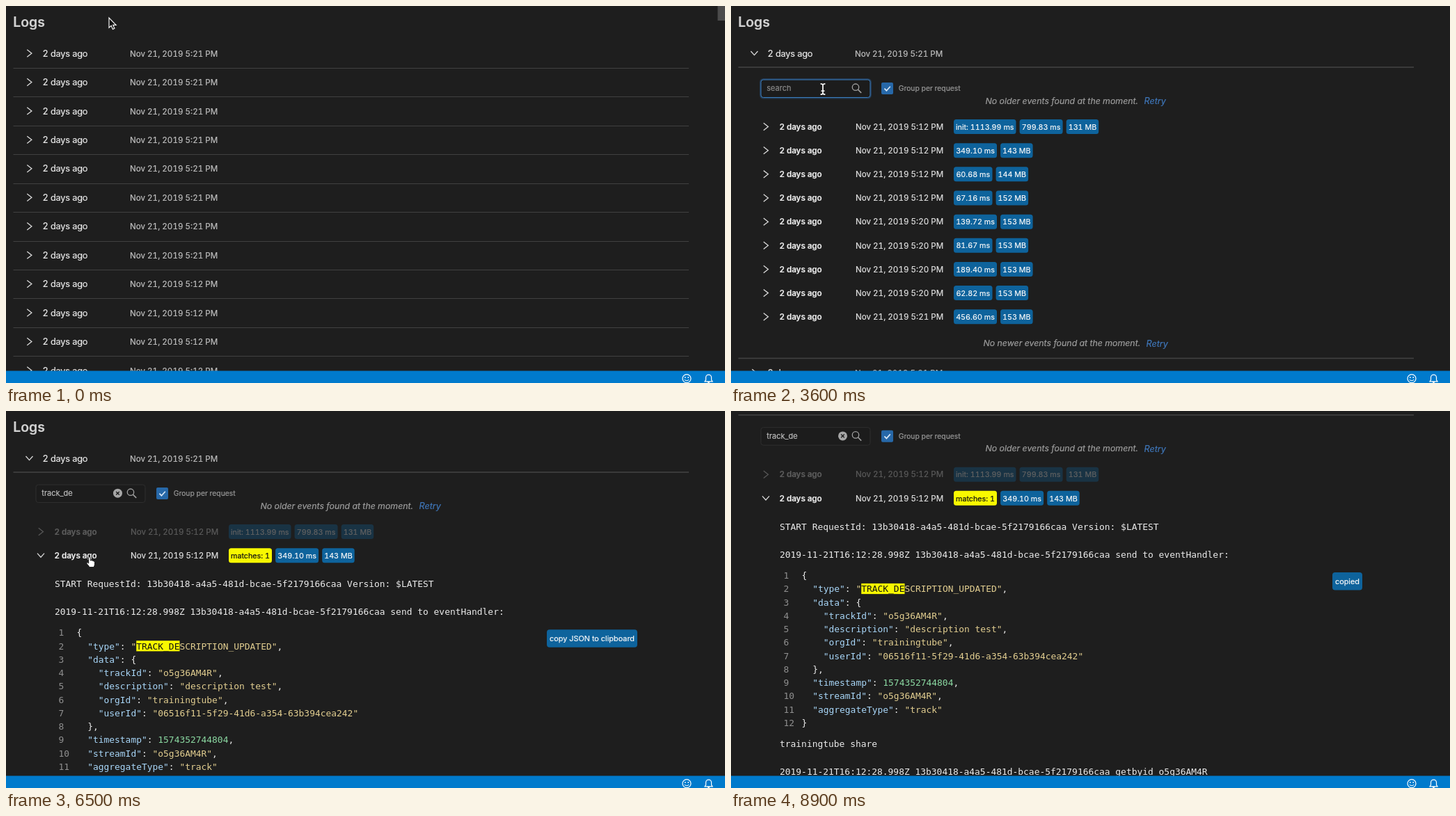
Animation, 1033 px wide and 542 px high, one loop 9 s. Source, as an HTML page:

```html
<!DOCTYPE html>
<html lang="en">
<head>
<meta charset="utf-8">
<title>Logs</title>
<style>
html, body { margin: 0; width: 100%; height: 100%; overflow: hidden; background: #1e1e1e; }
svg { display: block; font-family: Inter, "Liberation Sans", sans-serif; font-feature-settings: "tnum"; }
text { white-space: pre; stroke-width: .2px; }
.mono { font-family: "DejaVu Sans Mono", "Liberation Mono", monospace; stroke: none; }
</style>
</head>
<body>
<svg id="stage" width="1033" height="542" viewBox="0 0 1033 542"></svg>
<script>
const LOOP = 9000;
const MONO = 12.93, CHAR = MONO * 0.602;
const BLUE = '#0e639c', YELLOW = '#f8f800';
const ID_A = '35991f60-ba7c-443c-a012-f3ffe69b9d5a';
const ID_B = '13b30418-a4a5-481d-bcae-5f2179166caa';
const QUERY = 'track_de';

// y is the middle of the capital letters; a hairline stroke gives the text a little more weight
const text = (x, y, s, size, fill, extra = '') =>
  `<text x="${x}" y="${(y + size * 0.362).toFixed(2)}" font-size="${size}" fill="${fill}" stroke="${fill}" ${extra}>${s}</text>`;
const rect = (x, y, w, h, fill, extra = '') =>
  `<rect x="${x}" y="${y}" width="${w}" height="${h}" fill="${fill}" ${extra}/>`;
const path = (d, stroke, width = 1.3, extra = '') =>
  `<path d="${d}" fill="none" stroke="${stroke}" stroke-width="${width}" ${extra}/>`;
const group = (id, body, extra = '') => `<g id="${id}" ${extra}>${body}</g>`;
const mono = (x, y, s, fill = '#ebebeb') => text(x, y, s, MONO, fill, 'class="mono"');

const chevron = (x, y, open) => open
  ? path(`M${x - 5} ${y - 3}l5 5.6l5 -5.6`, '#dadada')
  : path(`M${x - 3.2} ${y - 5.2}l6.6 5.2l-6.6 5.2`, '#dadada');
const rule = (y, w = 1) => rect(10.5, y - w / 2, 970.5, w, '#414141');

function outerRow(y, minute, open) {
  return chevron(33.5, y, open) +
    text(52.6, y, '2 days ago', 12.8, '#ebebeb', 'letter-spacing="-.2"') +
    text(178, y + 0.4, `Nov 21, 2019 5:${minute} PM`, 11.6, '#c0c0c0');
}

function tagWidth(s) {
  if (s.startsWith('init')) return 89.5;
  if (s.endsWith('MB')) return 46.5;
  return s.length < 9 ? 55.5 : 62;
}

function tags(list, y) {
  let x = 320;
  return list.map(s => {
    const w = tagWidth(s), hit = s.startsWith('matches');
    const out = rect(x, y - 10.5, w, 21, hit ? YELLOW : BLUE, 'rx="3.5"') +
      text(x + w / 2, y + 0.3, s, 10.75, hit ? '#111' : '#fafafa', 'text-anchor="middle"');
    x += w + 5.1;
    return out;
  }).join('');
}

function innerRow(y, minute, body, dim, open) {
  const content = Array.isArray(body) ? tags(body, y)
    : text(320, y, body, 11.5, '#e2e2e2', 'letter-spacing="-.14"');
  return `<g opacity="${dim ? 0.3 : 1}">` + chevron(50, y, open) +
    text(69.6, y, '2 days ago', 11.7, '#ececec', 'font-weight="600" letter-spacing="-.12"') +
    text(179, y, `Nov 21, 2019 5:${minute} PM`, 11.6, '#e2e2e2') + content + '</g>';
}

const notice = (x, y, s, linkX) =>
  text(x, y, s, 12.35, '#9d9d9d', 'font-style="italic"') +
  text(linkX, y, 'Retry', 12.6, '#3f76b8', 'font-style="italic"');

function listView() {
  let out = '';
  for (let i = 0; i < 12; i++) {
    const y = 68 + 41.45 * i;
    out += outerRow(y, i < 8 ? 21 : 12) + rule(Math.round(y + 20.8) + 0.5);
  }
  return out;
}

function flatView() {
  const stamp = (sec, id, s) => `2019-11-21T16:12:${sec}Z ${id} ${s}`;
  const start = id => `START RequestId: ${id} Version: $LATEST`;
  const rows = [
    start(ID_A),
    stamp('28.421', ID_A, 'send to eventHandler: {"type":"TR...'),
    stamp('28.425', ID_A, 'getbyid o5g36AM4R'),
    stamp('28.692', ID_A, 'getByIdUsingSnapshot G0kJrQ7zA'),
    stamp('28.817', ID_A, 'getbyid G0kJrQ7zA'),
    `END RequestId: ${ID_A}`,
    ['init: 1113.99 ms', '799.83 ms', '131 MB'],
    start(ID_B),
    stamp('28.998', ID_B, 'send to eventHandler: {"type":"T...'),
    stamp('28.998', ID_B, 'getbyid o5g36AM4R'),
    stamp('29.190', ID_B, 'getByIdUsingSnapshot G0kJrQ7...')
  ];
  return rows.map((r, i) => innerRow(173.5 + 33.27 * i + (i > 6 ? 0.7 : 0), 12, r)).join('');
}

const REQUESTS = [
  [12, 'init: 1113.99 ms', '799.83 ms', '131 MB'],
  [12, '349.10 ms', '143 MB'], [12, '60.68 ms', '144 MB'], [12, '67.16 ms', '152 MB'],
  [20, '139.72 ms', '153 MB'], [20, '81.67 ms', '153 MB'], [20, '189.40 ms', '153 MB'],
  [20, '62.82 ms', '153 MB'], [21, '456.60 ms', '153 MB']
];

function requestRow(i, filtered, open) {
  const [minute, ...list] = REQUESTS[i];
  const hit = i === 1 || i === 5;
  return innerRow(173.5 + 34.16 * i, minute, filtered && hit ? ['matches: 1', ...list] : list,
    filtered && !hit, open);
}

const requestView = filtered =>
  REQUESTS.map((_, i) => requestRow(i, filtered)).join('') +
  notice(362.5, 485, 'No newer events found at the moment.', 596.5) +
  rule(506.5, 1.6) + outerRow(527.5, 21);

function jsonLine(s) {
  return s.replace(/"[^"]*"(?=:)|"[^"]*"|\d{6,}|[^"\d]+/g, t => {
    if (t[0] !== '"') return /\d/.test(t) ? `<tspan fill="#8bd9a2">${t}</tspan>` : t;
    if (JSON_KEYS.has(t)) return `<tspan fill="#a8d6f8">${t}</tspan>`;
    return `<tspan fill="#e2ce90">${t.replace('TRACK_DE', '<tspan fill="#111">TRACK_DE</tspan>')}</tspan>`;
  });
}

const EVENT = {
  type: 'TRACK_DESCRIPTION_UPDATED',
  data: {
    trackId: 'o5g36AM4R', description: 'description test', orgId: 'trainingtube',
    userId: '06516f11-5f29-41d6-a354-63b394cea242'
  },
  timestamp: 1574352744804, streamId: 'o5g36AM4R', aggregateType: 'track'
};
const JSON_KEYS = new Set([...Object.keys(EVENT), ...Object.keys(EVENT.data)].map(k => `"${k}"`));

function detailView() {
  const x = 101.6;
  let out = requestRow(0, true) + requestRow(1, true, true) +
    mono(70, 248.4, `START RequestId: ${ID_B} Version: $LATEST`) +
    mono(70, 288.7, `2019-11-21T16:12:28.998Z ${ID_B} send to eventHandler:`) +
    rect(x + 11 * CHAR, 330.2, 8 * CHAR, 15.2, YELLOW);
  JSON.stringify(EVENT, null, 2).split('\n').forEach((s, i) => {
    const y = 318.6 + 19.27 * i;
    out += mono(75.5, y, i + 1, '#8f8f8f') + mono(x, y, jsonLine(s));
  });
  return out + mono(70, 560.2, 'trainingtube share') +
    mono(70, 600.5, `2019-11-21T16:12:28.998Z ${ID_B} getbyid o5g36AM4R`);
}

const button = (id, x, s) => group(id,
  rect(x, 314.3, 907 - x, 25.5, BLUE, 'rx="4"') +
  text((x + 907) / 2, 327.2, s, 10.9, '#fafafa', 'text-anchor="middle"'));

const toolbar =
  outerRow(68, 21, true) + rule(88, 1.6) +
  rect(43, 106, 157, 25.5, '#1c1c1c', 'rx="3.5" stroke="#2e2e2e" id="field"') +
  group('halo', rect(42, 105, 159, 27.5, 'none', 'rx="4.5" stroke="#2b6cb0" stroke-opacity=".35" stroke-width="2"')) +
  text(51.3, 118.5, 'search', 11, '#8a8a8a', 'id="typed"') +
  group('caret', rect(0, 111.5, 1, 14, '#e0e0e0')) +
  group('clear', '<circle cx="160.5" cy="118.2" r="6.5" fill="#a6a6a6"/>' +
    path('M158.2 115.9l4.6 4.6m0 -4.6l-4.6 4.6', '#1e1e1e', 1.4)) +
  '<circle cx="179" cy="116.7" r="4.7" fill="none" stroke="#a0a0a0" stroke-width="1.3"/>' +
  path('M182.4 120.1l4.8 4.8', '#a0a0a0', 1.5) +
  rect(216, 110, 17, 17, '#a3a3a3', 'rx="2" id="box"') +
  group('tick', path('M220.4 118.6l3 3.1l5.4 -6', '#d8e6f4', 1.7)) +
  text(240.7, 118.7, 'Group per request', 10.35, '#989898') +
  notice(365.5, 136.3, 'No older events found at the moment.', 593.5);

const statusBar = rect(0, 524.5, 1033, 17.5, '#007acc') +
  '<circle cx="978" cy="535.6" r="6" fill="none" stroke="#fff" stroke-width="1.2"/>' +
  '<circle cx="975.8" cy="534" r=".9" fill="#fff"/><circle cx="980.2" cy="534" r=".9" fill="#fff"/>' +
  path('M974.8 537q3.2 3.6 6.4 0', '#fff', 1.1) +
  path('M1004 539.8h11l-1.5 -2.3v-3.4a4 4 0 0 0 -8 0v3.4zM1008.2 540.4q1.3 1.9 2.6 0', '#fff', 1.2);

const pointers =
  group('arrow', '<path d="M0 0v14.2l3.2 -3l2.2 5.2l2.5 -1.1l-2.2 -5h4.4z" fill="#111" stroke="#f2f2f2" stroke-width="1.2"/>') +
  group('beam', path('M-3.4 -7.6q3.4 0 3.4 2.2v10.8q0 2.2 -3.4 2.2M3.4 -7.6q-3.4 0 -3.4 2.2v10.8q0 2.2 3.4 2.2M-2.4 2.6h4.8', '#f2f2f2', 1.8)) +
  group('hand', '<path d="M-1.3 -1.5q1.4 -1.6 2.6 0v4.5l1 -.2q1.2 -.6 1.8 .5q1.5 -.5 1.9 .8q1.5 -.1 1.5 1.4v2.7q-.2 2 -1.4 4.3h-6.2q-1.6 -2.7 -4 -5.3q-.4 -1.8 1.4 -1.4l1.4 1.3z" fill="#fff" stroke="#111" stroke-width=".9"/>');

const stage = document.getElementById('stage');
stage.innerHTML = group('page',
  text(10.3, 22.8, 'Logs', 19.4, '#d2d2d2', 'font-weight="600"') +
  group('list', listView()) +
  group('panel', toolbar + group('flat', flatView()) + group('plain', requestView(false)) +
    group('found', requestView(true)) +
    group('detail', detailView() + button('copy', 777, 'copy JSON to clipboard') + button('copied', 864, 'copied')))) +
  group('thumb', rect(1022.5, 0, 10.5, 21, '#4c4c4c')) + statusBar + group('pointer', pointers);

const el = {};
stage.querySelectorAll('[id]').forEach(n => { el[n.id] = n; });
const show = (id, on) => el[id].setAttribute('display', on ? 'inline' : 'none');

const ease = p => p * p * (3 - 2 * p);
const ramp = (t, a, b) => ease(Math.min(1, Math.max(0, (t - a) / (b - a))));

// time, x, y, pointer shape
const MOVES = [
  [0, 148, 17, 'arrow'], [60, 148, 17, 'arrow'], [400, 143, 69, 'hand'], [950, 143, 69, 'hand'],
  [1300, 142, 113.5, 'beam'], [1580, 142, 113.5, 'beam'], [2000, 224, 118, 'hand'],
  [2550, 224, 118, 'hand'], [3200, 132, 119.5, 'beam'], [5850, 132, 119.5, 'beam'],
  [6300, 120, 212, 'hand'], [6850, 120, 212, 'hand'], [7250, 335.5, 378.5, 'arrow'],
  [7400, 335.5, 378.5, 'arrow'], [7850, 842, 239, 'hand'], [8300, 842, 239, 'hand'],
  [8700, 1050, 300, 'arrow'], [LOOP, 1050, 300, 'arrow']
];

function movePointer(t) {
  const i = MOVES.findIndex(m => m[0] > t);
  const a = MOVES[i - 1], b = MOVES[i];
  const p = ramp(t, a[0], b[0]);
  const shape = p > 0.7 ? b[3] : a[3];
  el.pointer.setAttribute('transform',
    `translate(${a[1] + (b[1] - a[1]) * p} ${a[2] + (b[2] - a[2]) * p})`);
  ['arrow', 'beam', 'hand'].forEach(s => show(s, s === shape));
  show('pointer', t < 3900 || t >= 5850);
}

function draw(t) {
  const open = t >= 700, grouped = t >= 2100, filtered = t >= 4900, detail = t >= 6400;
  const focus = t >= 3300 && !detail;
  const copied = t >= 8100;
  const count = Math.min(QUERY.length, Math.max(0, Math.floor((t - 3900) / 100)));

  show('list', !open);
  show('panel', open);
  show('thumb', !open);
  show('flat', !grouped);
  show('plain', grouped && !filtered);
  show('found', filtered && !detail);
  show('detail', detail);
  show('copy', !copied);
  show('copied', copied);

  show('tick', grouped);
  el.box.setAttribute('fill', grouped ? '#2768a8' : '#a3a3a3');
  show('halo', focus);
  el.field.setAttribute('stroke', focus ? '#3f82c4' : '#2e2e2e');

  const ink = count ? '#bcbcbc' : '#8a8a8a';
  el.typed.textContent = count ? QUERY.slice(0, count) : 'search';
  el.typed.setAttribute('fill', ink);
  el.typed.setAttribute('stroke', ink);
  show('clear', count > 0);
  const typing = t >= 3900 && t < 4900;
  show('caret', focus && t >= 3700 && (typing || (t - 4900) % 1000 < 600));
  if (open) {
    const w = count ? el.typed.getComputedTextLength() : 0;
    el.caret.setAttribute('transform', `translate(${51.3 + w} 0)`);
  }

  const scroll = 89.4 * ramp(t, 6880, 7250) - 7.1 * ramp(t, 8300, 8700);
  el.page.setAttribute('transform', `translate(0 ${-scroll})`);
  movePointer(t);
}

function tick() {
  draw(performance.now() % LOOP);
  requestAnimationFrame(tick);
}
tick();
</script>
</body>
</html>
```
